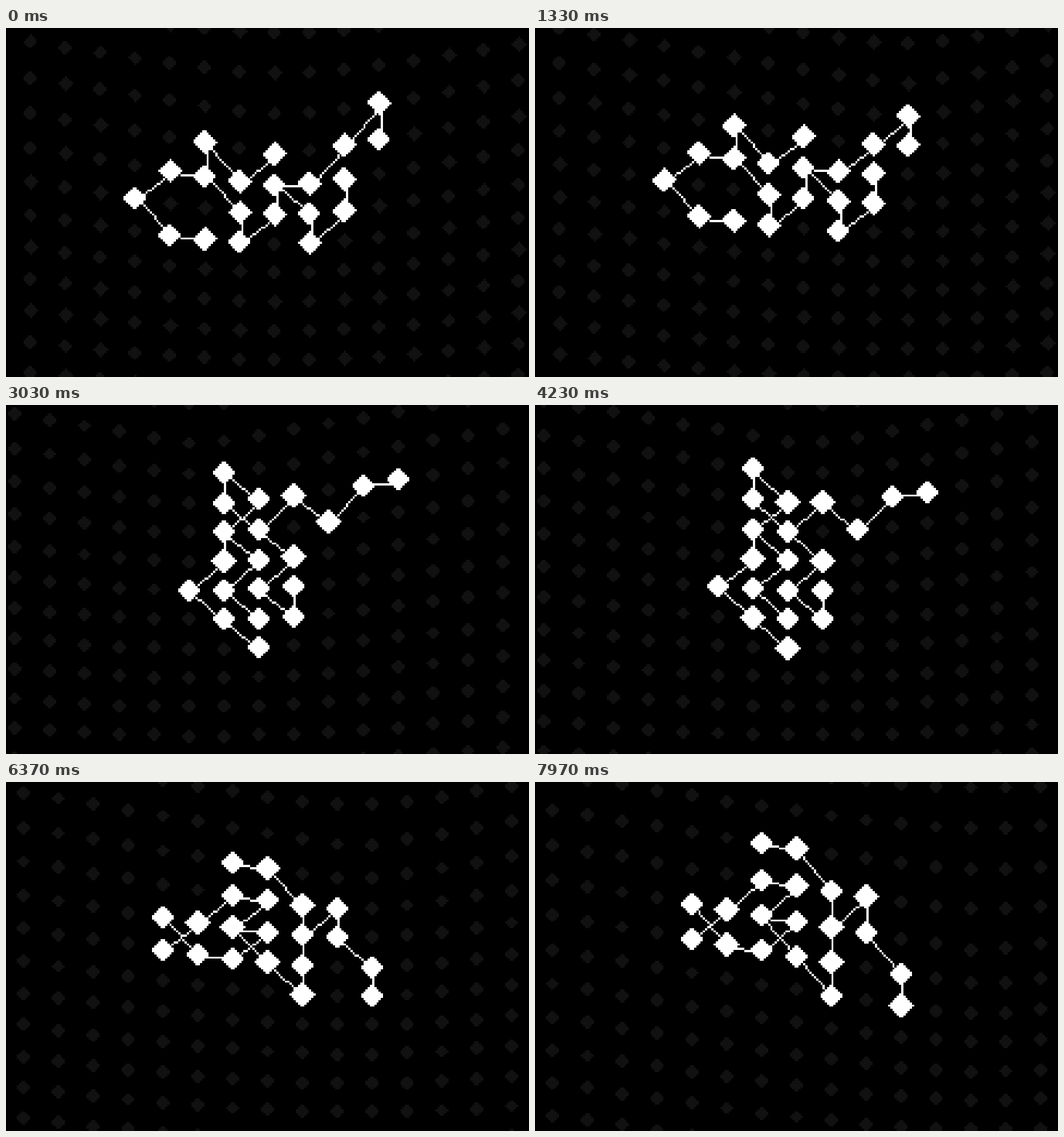
Animation, 917 px wide and 611 px high, one loop 8000 ms. Source, as an HTML page with a canvas:

```html
<!DOCTYPE html>
<html lang="en">
<head>
<meta charset="utf-8">
<title>Constellations</title>
<style>
html, body { margin: 0; width: 100%; height: 100%; overflow: hidden; background: #000; }
canvas { display: block; width: 100vw; height: 100vh; image-rendering: pixelated; }
</style>
</head>
<body>
<canvas id="sky" width="240" height="160"></canvas>
<script>
const ctx = document.getElementById('sky').getContext('2d');
const LOOP = 8000, CELL = 16, COLS = 15, SLOPE = 1 / 6;

// Each scene: end time, grid origin, and strokes as column/row pairs in hex.
const scenes = [
  { end: 1700, x: 11.2, y: 10.4, paths: ['56 46 35 44 54 53 64 73', '54 65 66 75 74 84 93 a2 a3', '74 85 86 95 94'] },
  { end: 5930, x: 4, y: 18.3, paths: ['77 66 55 64 63 72 61 62 73 82 93 a2 b2', '63 74 65 76', '73 84 75 86 85'] },
  { end: LOOP, x: 8, y: 14.3, paths: ['62 72 83 84 85 86 75 64 73 63 54 45', '44 55 65 74 64', '84 93 94 a5 a6'] }
];
for (const s of scenes) {
  s.paths = s.paths.map(p => p.split(' ').map(n => [...n].map(d => parseInt(d, 16))));
}

// The wandering point that pulls the grid: time, x, y
const track = [
  [230, 127, 60.7], [1330, 168, 30.4], [3030, 89, 18.5], [4230, 125.5, 17],
  [5430, 187, 39], [7170, 141, 40], [7970, 206.5, 84.5]
];

function slope(i, k) {
  const a = track[Math.max(i - 1, 0)], b = track[Math.min(i + 1, track.length - 1)];
  return (b[k] - a[k]) / (b[0] - a[0]);
}

function pull(time) {
  const last = track.length - 1;
  const t = Math.min(Math.max(time, track[0][0]), track[last][0]);
  let i = 0;
  while (i < last - 1 && t > track[i + 1][0]) i++;
  const a = track[i], b = track[i + 1], h = b[0] - a[0], u = (t - a[0]) / h;
  const v = 1 - u;
  return [1, 2].map(k =>
    a[k] * (1 + 2 * u) * v * v + slope(i, k) * h * u * v * v +
    b[k] * u * u * (3 - 2 * u) - slope(i + 1, k) * h * u * u * v);
}

function diamond(x, y, r) {
  for (let py = Math.floor(y - r); py <= y + r; py++) {
    const half = r - Math.abs(py + 0.5 - y);
    if (half < 0) continue;
    const from = Math.ceil(x - half - 0.5), to = Math.floor(x + half - 0.5);
    if (to >= from) ctx.fillRect(from, py, to - from + 1, 1);
  }
}

function line(a, b) {
  const [x0, y0, x1, y1] = [...a, ...b].map(v => Math.round(v + 0.4));
  const n = Math.max(Math.abs(x1 - x0), Math.abs(y1 - y0));
  for (let i = 0; i <= n; i++) {
    const u = n ? i / n : 0;
    ctx.fillRect(Math.round(x0 + (x1 - x0) * u), Math.round(y0 + (y1 - y0) * u), 1, 1);
  }
}

function draw(t) {
  const scene = scenes.find(s => t < s.end);
  const [cx, cy] = pull(t);
  const place = ([col, row]) => {
    const x = scene.x + col * CELL, y = scene.y + row * CELL;
    return [x, y - SLOPE * Math.hypot(x - cx, y - cy)];
  };

  ctx.fillStyle = '#000';
  ctx.fillRect(0, 0, 240, 160);

  ctx.fillStyle = '#111';
  for (let col = 0; col < COLS; col++) {
    for (let row = -2; row < 14; row++) diamond(...place([col, row]), 3.45);
  }

  ctx.fillStyle = '#fff';
  for (const path of scene.paths) {
    const pts = path.map(place);
    pts.forEach((p, i) => {
      if (i) line(pts[i - 1], p);
      diamond(...p, 5.65);
    });
  }
}

const start = performance.now();
function frame() {
  draw((performance.now() - start) % LOOP);
  requestAnimationFrame(frame);
}
frame();
</script>
</body>
</html>
```
